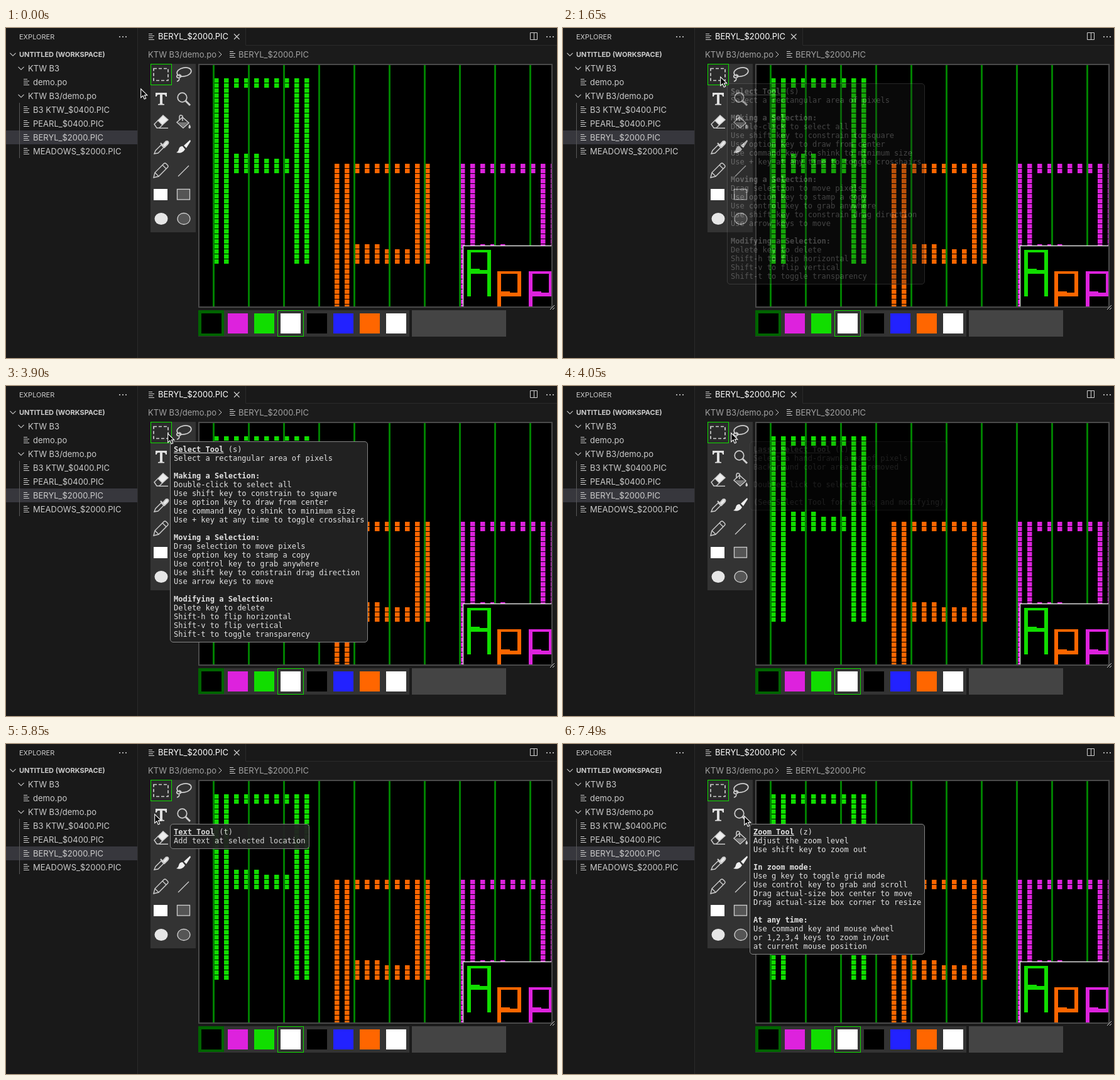
Recreate the animation shown at these times as an HTML page. Size 877x525 px, loop 8000 ms.

```html
<!DOCTYPE html>
<html lang="en">
<head>
<meta charset="utf-8">
<title>Pixel editor tooltips</title>
<style>
html, body { margin: 0; width: 100%; height: 100%; overflow: hidden; background: #1b1b1b; }
svg { position: absolute; left: 0; top: 0; display: block; }
.ui { font: 13px Inter, "Open Sans", sans-serif; fill: #cccccc; }
.small { font-size: 11px; }
.dim { fill: #a2a2a2; }
.line { fill: none; stroke: #cfcfcf; }

.tip {
  position: absolute; box-sizing: border-box; margin: 0; padding: 5px;
  border: 1px solid #858585; border-radius: 5px; background: #212121; color: #e2e2e2;
  font: 12px/14px "DejaVu Sans Mono", "Liberation Mono", monospace;
  white-space: pre; opacity: 0; animation: 8s step-end infinite;
}
.tip u { font-weight: bold; }
#select { left: 261px; top: 88px; animation-name: select; }
#lasso  { left: 297px; top: 88px; animation-name: lasso; }
#text   { left: 261px; top: 127px; animation-name: text; }
#zoom   { left: 297px; top: 127px; animation-name: zoom; }

@keyframes select {
  0% { opacity: 0 } 20.625% { opacity: .3 } 22.5% { opacity: .8 }
  24.375% { opacity: 1 } 50.625%, 100% { opacity: 0 }
}
@keyframes lasso {
  0% { opacity: 0 } 50.625% { opacity: .13 } 52.5% { opacity: .65 }
  54.375% { opacity: 1 } 71.25%, 100% { opacity: 0 }
}
@keyframes text {
  0% { opacity: 0 } 71.25% { opacity: .5 } 73.125% { opacity: .95 }
  75% { opacity: 1 } 88.125%, 100% { opacity: 0 }
}
@keyframes zoom {
  0% { opacity: 0 } 89.875% { opacity: .55 } 91.75%, 100% { opacity: 1 }
}

#cursor { overflow: visible; animation: move 8s step-end infinite; }
@keyframes move {
  0% { transform: translate(214px, 96px) }
  3.75% { transform: translate(214px, 95px) }
  5.625% { transform: translate(215px, 92px) }
  7.5% { transform: translate(231px, 81px) }
  9.375% { transform: translate(250px, 77px) }
  48.75% { transform: translate(257px, 75px) }
  50.625% { transform: translate(267px, 74px) }
  52.5% { transform: translate(280px, 75px) }
  67.5% { transform: translate(281px, 76px) }
  69.375% { transform: translate(266px, 84px) }
  71.25% { transform: translate(237px, 109px) }
  73.125% { transform: translate(236px, 111px) }
  86.25% { transform: translate(237px, 112px) }
  88.125% { transform: translate(266px, 112px) }
  89.875% { transform: translate(273px, 112px) }
  91.75% { transform: translate(284px, 114px) }
  93.625%, 100% { transform: translate(288px, 114px) }
}
</style>
</head>
<body>
<svg width="877" height="525" viewBox="0 0 877 525">
  <defs>
    <path id="file" class="line" d="M0 .5h6M0 3.5h9M0 6.5h7M0 9.5h9"/>
    <path id="down" class="line" stroke-width="1.1" d="M-4.5 -2.2L0 2.3L4.5 -2.2"/>
    <g id="dots" fill="#cfcfcf"><circle r="1.1"/><circle cx="5" r="1.1"/><circle cx="10" r="1.1"/></g>
    <clipPath id="view"><rect x="308" y="59" width="560" height="384"/></clipPath>
  </defs>

  <!-- sidebar -->
  <rect width="209" height="525" fill="#191919"/>
  <rect y="163" width="209" height="22" fill="#37373d"/>
  <path d="M209.5 0V525" stroke="#2b2b2b"/>
  <path d="M21.5 119V207" stroke="#585858"/>
  <g class="ui">
    <text class="small" x="21" y="17.5">EXPLORER</text>
    <text class="small" x="21" y="46" font-weight="700">UNTITLED (WORKSPACE)</text>
    <text x="35" y="69">KTW B3</text>
    <text x="43" y="91">demo.po</text>
    <text x="35" y="113">KTW B3/demo.po</text>
    <text x="43" y="135">B3 KTW_$0400.PIC</text>
    <text x="43" y="157">PEARL_$0400.PIC</text>
    <text x="43" y="179">BERYL_$2000.PIC</text>
    <text x="43" y="201">MEADOWS_$2000.PIC</text>
  </g>
  <use href="#dots" x="181" y="14"/>
  <use href="#down" x="11" y="42"/>
  <use href="#down" x="24" y="64"/>
  <use href="#down" x="24" y="108"/>
  <use href="#file" x="28" y="81"/>
  <use href="#file" x="28" y="125"/>
  <use href="#file" x="28" y="147"/>
  <use href="#file" x="28" y="169"/>
  <use href="#file" x="28" y="191"/>

  <!-- tab bar and breadcrumb -->
  <rect x="382" width="495" height="28" fill="#191919"/>
  <path d="M381.5 0V27.5H877" fill="none" stroke="#2b2b2b"/>
  <use href="#file" x="227" y="9"/>
  <text class="ui" x="242" y="18" font-style="italic" style="fill:#fff">BERYL_$2000.PIC</text>
  <path class="line" stroke-width="1.2" d="M363 9.5l8.5 8.5m0 -8.5l-8.5 8.5"/>
  <path class="line" d="M834.5 7.5h11v11h-11zM840.5 7.5v11"/>
  <use href="#dots" x="861" y="14"/>
  <g class="ui">
    <text class="dim" x="226" y="47">KTW B3/demo.po</text>
    <text class="dim" x="370" y="47">BERYL_$2000.PIC</text>
  </g>
  <path class="line" d="M338.5 37.5l4.5 4.5l-4.5 4.5"/>
  <use href="#file" x="356" y="37"/>

  <!-- toolbox -->
  <rect x="230" y="57" width="72" height="268" fill="#333"/>
  <rect x="230.5" y="57.5" width="33" height="33" fill="#2b2b2b" stroke="#11dd00"/>
  <g class="line" stroke-width="1.7">
    <rect x="235" y="64.5" width="23" height="19" stroke-dasharray="5 3"/>
    <g>
      <ellipse cx="283.5" cy="70" rx="11.5" ry="6.8" transform="rotate(-12 283.5 70)"/>
      <path d="M274 74c-4 3-2 6 2 5c4-1 3-5-1-5M275 79c2 3 0 5-3 6"/>
    </g>
    <g>
      <circle cx="280.5" cy="110.5" r="7.3"/>
      <path d="M286 116l7 7" stroke-width="3"/>
    </g>
    <g stroke-width="1.4">
      <path d="M236 153l6-6l7 7l-5 5h-4z"/>
      <path d="M242 147l8-8l8 7l-9 8z" fill="#eee"/>
      <path d="M244 159.3h14"/>
    </g>
    <g stroke-width="1.5">
      <path d="M272 150l9-8l10 9l-9 8z"/>
      <path d="M274 150h16l-8 8z" fill="#777" stroke="none"/>
      <path d="M281 148v-8q-4-3-5 1v5"/>
      <path d="M292 153q4 6 0 7q-3-1 0-7z" fill="#cfcfcf" stroke="none"/>
    </g>
    <g>
      <path d="M236 200l2-5l9-9l4 4l-9 9z" stroke-width="1.4"/>
      <path d="M246 183l7 7M249 187l5-6q3-2 4 0q1 2-1 4l-5 5z" fill="#eee" stroke-width="2.2"/>
    </g>
    <path d="M293 178l-10 9l4 4l7-11zM281 188q-5 0-6 5q-1 4-4 5q9 3 14-5z" fill="#eee" stroke="none"/>
    <path d="M235 238l2-8l14-14q2-2 4 0l2 2q2 2 0 4l-14 14zM237 230l6 6M249 218l6 6" stroke-width="1.4"/>
    <path d="M274 236l17-17" stroke-width="1.3"/>
    <rect x="272.5" y="256.5" width="20" height="16.5" fill="#555" stroke-width="1.3"/>
    <ellipse cx="283" cy="303.5" rx="10" ry="9" fill="#555" stroke-width="1.3"/>
  </g>
  <path fill="#e0e0e0" d="M238 103h18v6h-2q0-3-3-3h-2v14q0 1 3 1v1.500h-10v-1.500q3 0 3-1v-14h-2q-3 0-3 3h-2z"/>
  <rect x="235" y="256" width="22" height="18" fill="#fff"/>
  <ellipse cx="247" cy="303.500" rx="10.500" ry="9.500" fill="#e6e6e6"/>

  <!-- picture -->
  <rect x="307" y="58" width="562" height="386" fill="#000" stroke="#4a4a4a" stroke-width="2"/>
  <g clip-path="url(#view)">
    <g id="art"></g>
    <path id="bytes" stroke="#008000" stroke-width="3"/>
    <rect x="727.5" y="346.5" width="150" height="110" fill="#000" stroke="#e0e0e0" stroke-width="1.5"/>
    <g id="mini"></g>
  </g>
  <path class="line" d="M866 448l7-7M870 448l3-3"/>

  <!-- palette -->
  <rect x="306" y="449" width="336" height="42" fill="#333"/>
  <rect x="306" y="449" width="41" height="41" fill="#006400"/>
  <g id="palette"></g>
  <rect x="432.5" y="449.5" width="41" height="41" fill="none" stroke="#11dd00"/>
  <rect x="646" y="449" width="150" height="42" fill="#444"/>
</svg>

<div class="tip" id="select"><u>Select Tool</u> (s)
Select a rectangular area of pixels

<b>Making a Selection:</b>
Double-click to select all
Use shift key to constrain to square
Use option key to draw from center
Use command key to shink to minimum size
Use + key at any time to toggle crosshairs

<b>Moving a Selection:</b>
Drag selection to move pixels
Use option key to stamp a copy
Use control key to grab anywhere
Use shift key to constrain drag direction
Use arrow keys to move

<b>Modifying a Selection:</b>
Delete key to delete
Shift-h to flip horizontal
Shift-v to flip vertical
Shift-t to toggle transparency</div>
<div class="tip" id="lasso"><u>Lasso Select Tool</u> (l)
Select a hand-drawn area of pixels
Background color area is removed

Double-click to select all

(See Select Tool for moving and modifying)</div>
<div class="tip" id="text"><u>Text Tool</u> (t)
Add text at selected location</div>
<div class="tip" id="zoom"><u>Zoom Tool</u> (z)
Adjust the zoom level
Use shift key to zoom out

<b>In zoom mode:</b>
Use g key to toggle grid mode
Use control key to grab and scroll
Drag actual-size box center to move
Drag actual-size box corner to resize

<b>At any time:</b>
Use command key and mouse wheel
or 1,2,3,4 keys to zoom in/out
at current mouse position</div>

<svg id="cursor" width="12" height="18" viewBox="0 0 12 18">
  <path d="M.7 .8V14.800L4 11.800L6.200 17L8.700 16L6.500 10.900H10.800Z" fill="#000" stroke="#fff" stroke-width="1.1"/>
</svg>

<script>
const $ = id => document.getElementById(id);
const box = (x, y, w, h) => `M${x} ${y}h${w}v${h}h${-w}z`;

function add(parent, d, fill) {
  const path = document.createElementNS("http://www.w3.org/2000/svg", "path");
  path.setAttribute("d", d);
  path.setAttribute("fill", fill);
  $(parent).append(path);
}

// Stem lengths and the crossbar's first row are counted in picture rows.
const letters = [
  { x: 331, y: 80, left: 37, right: 37, bar: 15, fill: "#11dd00" },
  { x: 523, y: 216, left: 40, right: 20, bar: 16, fill: "#ff6600" },
  { x: 723, y: 216, left: 40, right: 20, bar: 16, fill: "#dd22dd" }
];

// Row ranges filled in one of a letter's ten columns.
function spans(letter, col) {
  if (col < 2) return [[0, letter.left]];
  if (col > 7) return [[0, letter.right]];
  return [[0, 2], [letter.bar + (col > 4 ? 1 : 0), letter.bar + 4]];
}

for (const letter of letters) {
  const mx = 734 + (letter.x - 331) / 4, my = 353 + (letter.y - 80) / 4;
  let big = "", small = "";
  for (let col = 0; col < 10; col++) {
    const inner = col > 1 && col < 8;
    for (const [from, to] of spans(letter, col)) {
      for (let row = from; row < to; row++) {
        big += box(letter.x + col * 16, letter.y + row * 8, 7.5, 7);
      }
      const x = mx + col * 4 - (inner ? 2 : 0);
      const w = inner ? 6 : col % 8 ? 2 : 4;
      small += box(x, my + from * 2, w, (to - from) * 2);
    }
  }
  add("art", big, letter.fill);
  add("mini", small, letter.fill);
}

let bytes = "";
for (let x = 330.5; x < 868; x += 56) bytes += `M${x} 59V443`;
$("bytes").setAttribute("d", bytes);

["#000", "#dd22dd", "#11dd00", "#fff", "#000", "#2222ff", "#ff6600", "#fff"]
  .forEach((fill, i) => add("palette", box(311 + i * 42, 454, 32, 32), fill));
</script>
</body>
</html>
```
